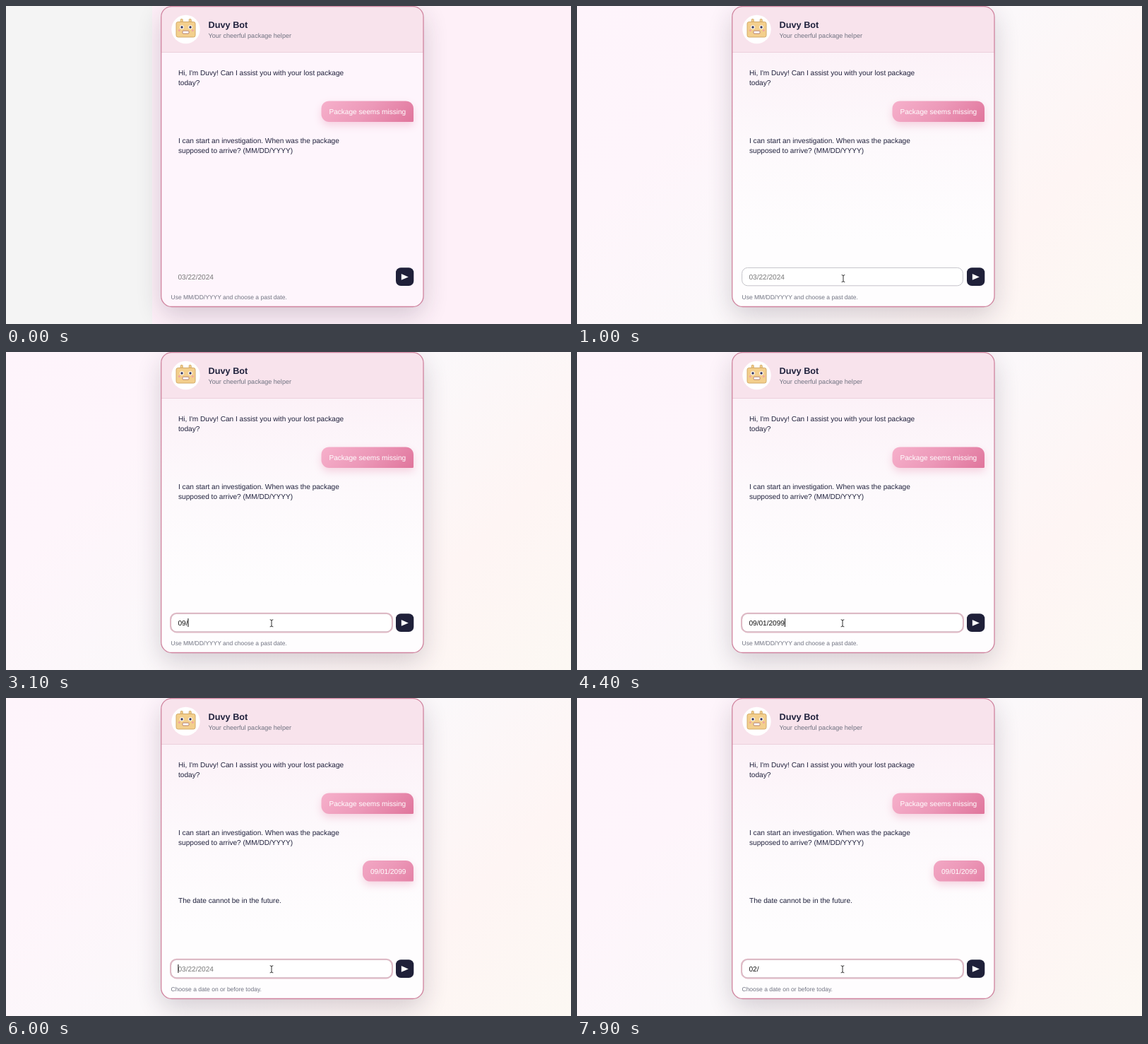
Recreate the animation shown at these times as an HTML page with a canvas. Size 800 by 450 pixels, loop 8 s.

```html
<!DOCTYPE html>
<html lang="en">
<head>
<meta charset="utf-8">
<title>Package chat</title>
<style>
html, body { margin: 0; width: 100%; height: 100%; overflow: hidden; background: #fdf6fa; }
canvas { display: block; width: 100vw; height: 100vh; }
</style>
</head>
<body>
<canvas id="stage" width="800" height="450"></canvas>
<script>
const W = 800, H = 450, LOOP = 8000;
const ctx = document.getElementById('stage').getContext('2d');
const INK = '#20223d', MUTED = '#6f7280';

const FOCUS = 1300, SEND = 4900, REPLY = 5250;
const FIRST = { text: '09/01/2099', start: 2650, step: 170 };
const SECOND = { text: '02/', start: 6960, step: 205 };

const clamp = v => Math.max(0, Math.min(1, v));
const ramp = (t, start, length) => clamp((t - start) / length);

function roundRect(x, y, w, h, r) {
  ctx.beginPath();
  ctx.roundRect(x, y, w, h, r);
}

function gradient(x0, y0, x1, y1, ...colors) {
  const g = ctx.createLinearGradient(x0, y0, x1, y1);
  colors.forEach((c, i) => g.addColorStop(i / (colors.length - 1), c));
  return g;
}

function withShadow(color, blur, dy, draw) {
  ctx.save();
  ctx.shadowColor = color;
  ctx.shadowBlur = blur;
  ctx.shadowOffsetY = dy;
  draw();
  ctx.restore();
}

function label(str, x, y, size = 10.1, color = INK, weight = 400) {
  ctx.font = `${weight} ${size}px "Liberation Sans", Arial, sans-serif`;
  ctx.fillStyle = color;
  ctx.fillText(str, x, y);
}

function faded(alpha, draw) {
  if (alpha <= 0) return;
  ctx.save();
  ctx.globalAlpha = alpha;
  draw();
  ctx.restore();
}

function page(wash) {
  ctx.fillStyle = gradient(88, -88, 712, 538, '#fef4fb', '#fef5fb', '#fbf8fa', '#fef5f4', '#fcf8f3');
  ctx.fillRect(0, 0, W, H);
  faded(wash, () => {
    ctx.fillStyle = '#f4f4f4';
    ctx.fillRect(0, 0, 207, H);
    ctx.fillStyle = '#fef0f8';
    ctx.fillRect(207, 0, W - 207, H);
  });
}

function avatar() {
  ctx.fillStyle = '#fff';
  ctx.beginPath();
  ctx.arc(254.5, 33, 20.2, 0, 7);
  ctx.fill();

  ctx.lineWidth = 1;
  ctx.strokeStyle = '#d3aa68';
  ctx.fillStyle = '#f3cf8d';
  for (const x of [247.2, 259.2]) {
    roundRect(x, 18.5, 3, 6, 1);
    ctx.fill();
    ctx.stroke();
  }
  roundRect(241, 22.5, 27, 21.5, 2.5);
  ctx.fill();
  ctx.stroke();

  for (const x of [249, 261]) {
    ctx.fillStyle = '#fff';
    ctx.beginPath();
    ctx.arc(x, 30, 2.8, 0, 7);
    ctx.fill();
    ctx.fillStyle = '#34345c';
    ctx.beginPath();
    ctx.arc(x, 30, 1.7, 0, 7);
    ctx.fill();
  }
  ctx.fillStyle = '#f0a5a0';
  for (const x of [245.3, 264.3]) {
    ctx.beginPath();
    ctx.arc(x, 34.5, 1.5, 0, 7);
    ctx.fill();
  }
  roundRect(250, 35.2, 9, 3.8, 1);
  ctx.fillStyle = '#fff';
  ctx.fill();
  ctx.strokeStyle = '#a66b61';
  ctx.lineWidth = 0.8;
  ctx.stroke();
}

function card(wash) {
  const shape = () => roundRect(219.7, 0.5, 371.3, 425, 15);
  withShadow('rgba(45,30,55,.2)', 36, 12, () => {
    shape();
    ctx.fillStyle = '#fff';
    ctx.fill();
  });
  ctx.save();
  shape();
  ctx.clip();
  ctx.fillStyle = gradient(0, 66, 0, 330, '#fcf2f8', '#fdf9fc', '#fefdfe');
  ctx.fillRect(219, 0, 373, 427);
  faded(wash, () => {
    ctx.fillStyle = '#fef5fc';
    ctx.fillRect(219, 66, 373, 360);
  });
  ctx.fillStyle = '#f8e3ec';
  ctx.fillRect(219, 0, 373, 65.5);
  ctx.fillStyle = '#ecd0dc';
  ctx.fillRect(219, 65, 373, 1);
  ctx.restore();
  shape();
  ctx.strokeStyle = '#d0849f';
  ctx.lineWidth = 1.3;
  ctx.stroke();

  avatar();
  label('Duvy Bot', 286.6, 31, 12.7, INK, 700);
  label('Your cheerful package helper', 286.6, 45, 9.05, MUTED);
}

function bubble(str, x, y) {
  const w = 577 - x, h = 29.6;
  withShadow('rgba(226,122,160,.3)', 12, 5, () => {
    roundRect(x, y, w, h, [11, 11, 1.5, 11]);
    ctx.fillStyle = gradient(x + w / 2 - 40, y - 25, x + w / 2 + 40, y + h + 25, '#f6b0cb', '#ec98b8', '#e0759c');
    ctx.fill();
  });
  label(str, x + 10.9, y + 18.5, 10.1, '#fff');
}

function messages(t) {
  label("Hi, I'm Duvy! Can I assist you with your lost package", 244, 97.5);
  label('today?', 244, 111.5);
  bubble('Package seems missing', 446.5, 134.4);
  label('I can start an investigation. When was the package', 244, 193.5);
  label('supposed to arrive? (MM/DD/YYYY)', 244, 207.5);
  faded(ramp(t, SEND - 1, 120), () => bubble('09/01/2099', 505, 230));
  faded(ramp(t, REPLY - 1, 120), () => label('The date cannot be in the future.', 244, 289.5));
}

function typed(t) {
  const run = t < SEND ? FIRST : SECOND;
  const n = Math.floor((t - run.start) / run.step) + 1;
  const count = Math.max(0, Math.min(run.text.length, n));
  const idle = t < SEND ? FOCUS : SEND;
  const last = count ? run.start + (count - 1) * run.step : idle;
  return { value: run.text.slice(0, count), caret: t >= FOCUS && (t - last) % 1000 < 500 };
}

function field(t, wash) {
  const focus = ramp(t, FOCUS, 100);
  roundRect(233.6, 370.4, 312.8, 25.4, 8);
  ctx.fillStyle = '#fff';
  faded(1 - wash, () => {
    ctx.fill();
    ctx.strokeStyle = '#c5c4ca';
    ctx.lineWidth = 1;
    ctx.stroke();
  });
  faded(focus, () => {
    roundRect(233, 369.8, 314, 26.6, 8.5);
    ctx.strokeStyle = '#dfb9c5';
    ctx.lineWidth = 2;
    ctx.stroke();
  });

  const { value, caret } = typed(t);
  label(value || '03/22/2024', 243.4, 386.8, 10.1, value ? '#111' : '#777');
  if (caret) {
    const x = 243.4 + (value ? ctx.measureText(value).width : 0);
    ctx.fillStyle = '#111';
    ctx.fillRect(x, 377, 1, 12);
  }

  roundRect(552, 370.3, 25.3, 25.7, 7);
  ctx.fillStyle = '#1f2039';
  ctx.fill();
  ctx.fillStyle = '#fff';
  ctx.beginPath();
  ctx.moveTo(559.8, 379);
  ctx.lineTo(569.8, 383.4);
  ctx.lineTo(559.8, 387.8);
  ctx.fill();

  const hint = t < SEND ? 'Use MM/DD/YYYY and choose a past date.' : 'Choose a date on or before today.';
  label(hint, 233.5, 414.6, 8.5, MUTED);
}

function pointer(t) {
  const rest = Math.pow(1 - ramp(t, 300, 900), 2.5);
  const x = 376 + 43 * rest, y = 383.8 + 78 * rest;
  ctx.beginPath();
  for (const s of [-1, 1]) {
    ctx.moveTo(x - 2.3, y + s * 5);
    ctx.quadraticCurveTo(x, y + s * 5, x, y + s * 3.6);
    ctx.quadraticCurveTo(x, y + s * 5, x + 2.3, y + s * 5);
  }
  ctx.moveTo(x, y - 4);
  ctx.lineTo(x, y + 4);
  ctx.strokeStyle = '#333';
  ctx.lineWidth = 1;
  ctx.stroke();
}

function render(t) {
  const wash = 1 - ramp(t, 100, 500);
  ctx.textRendering = 'geometricPrecision';
  page(wash);
  card(wash);
  messages(t);
  field(t, wash);
  pointer(t);
}

const begin = performance.now();
function tick() {
  render((performance.now() - begin) % LOOP);
  requestAnimationFrame(tick);
}
tick();
</script>
</body>
</html>
```
